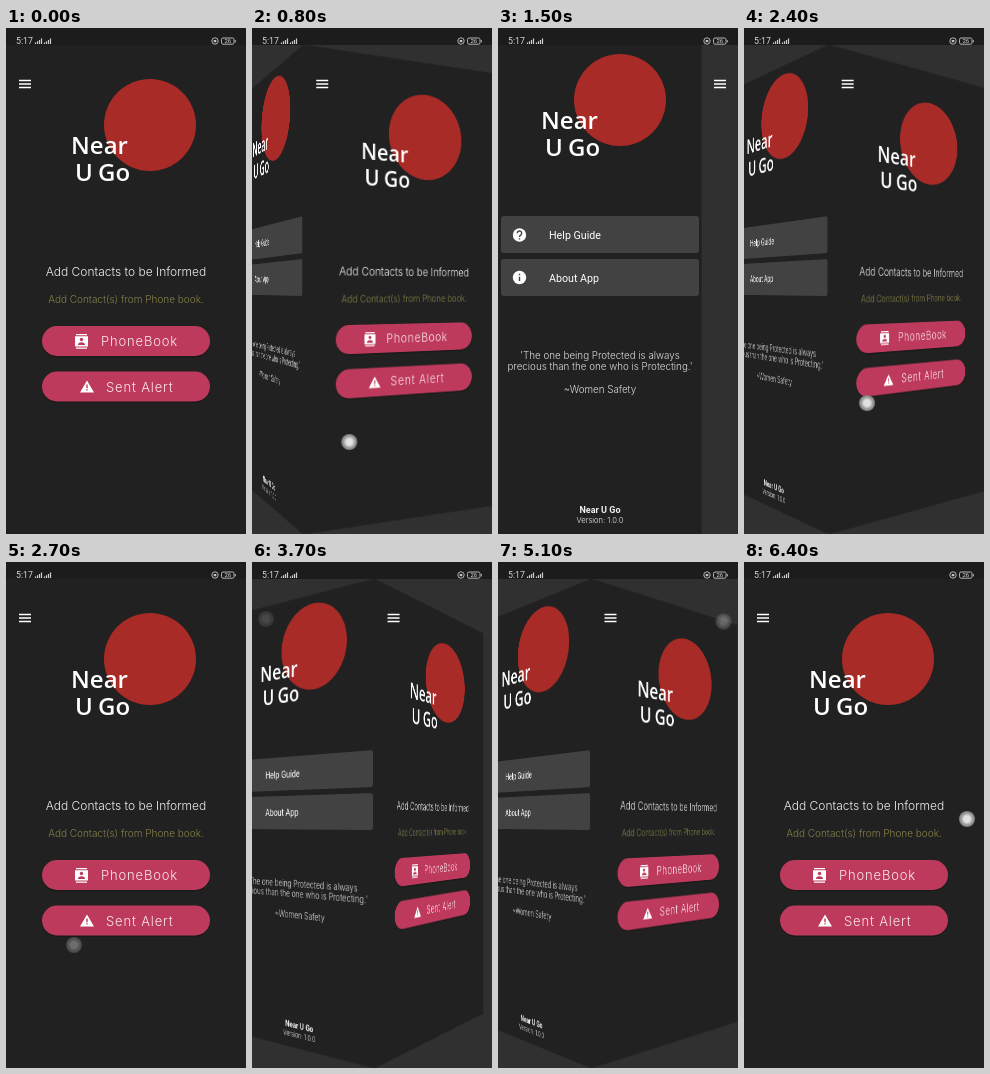
An HTML page that plays this animation: 240 by 506 pixels, repeating every 6500 ms.

```html
<!DOCTYPE html>
<html lang="en">
<head>
<meta charset="utf-8">
<title>Cube drawer</title>
<style>
  @property --open { syntax: "<number>"; inherits: true; initial-value: 0; }

  html, body { margin: 0; width: 100%; height: 100%; overflow: hidden; background: #303030; }
  .stage {
    position: relative; width: 240px; height: 506px; overflow: hidden;
    background: #303030;
    --slide: 203px;
    animation: drawer 6500ms linear infinite;
  }
  svg { position: absolute; top: 0; left: 0; display: block; }
  /* the thin shadow closes the seam between the two faces */
  .page { top: 17px; background: #212121; box-shadow: 0 0 0 .5px #212121; }
  .drawer {
    transform-origin: right center;
    transform: translateX(calc((var(--open) - 1) * var(--slide))) perspective(677px)
      rotateY(calc((var(--open) - 1) * 90deg));
  }
  .home {
    transform-origin: left center;
    transform: translateX(calc(var(--open) * var(--slide))) perspective(677px)
      rotateY(calc(var(--open) * 90deg));
  }
  .menu { transform: translateX(calc(var(--open) * var(--slide))); }

  text { fill: #f2f2f2; font-family: Inter, sans-serif; }
  .mid { text-anchor: middle; }
  .light { font-weight: 300; }
  .word { font: 600 24px "Open Sans", sans-serif; fill: #fff; }
  .item { font: 10.7px Roboto, sans-serif; fill: #fff; }
  .quote { font-size: 9.8px; fill: #dcdcdc; }
  .button { font-size: 13px; letter-spacing: .85px; fill: #fbe9ee; }
  .status { font: 8.8px Roboto, sans-serif; fill: #d8d8d8; }

  .touch {
    position: absolute; left: -8px; top: -8px; width: 16px; height: 16px;
    border-radius: 50%; opacity: 0;
    background: radial-gradient(circle, #e2e2e2 0 28%, #a5a5a5 48%, #777 72%);
    animation: touch 6500ms linear infinite;
  }

  @keyframes drawer {
    0%, 7.69% { --open: 0; }
    9.23% { --open: .04; }
    10.77% { --open: .13; }
    12.31% { --open: .251; }
    13.85% { --open: .42; }
    15.38% { --open: .6; }
    16.92% { --open: .78; }
    18.46% { --open: .93; }
    20%, 32.31% { --open: 1; }
    33.85% { --open: .92; }
    35.38% { --open: .7; }
    36.92% { --open: .42; }
    38.46% { --open: .18; }
    40% { --open: .03; }
    40.77%, 54.62% { --open: 0; }
    58.46%, 76.4% { --open: 1; }
    80.25%, 100% { --open: 0; }
  }
  @keyframes touch {
    /* drag open */
    0%, 7.3% { opacity: 0; transform: translate(46px, 414px); }
    7.69% { opacity: 1; transform: translate(46px, 414px); }
    10.77% { transform: translate(72px, 414px); }
    12.31% { transform: translate(97px, 414px); }
    15.38% { transform: translate(168px, 414px); }
    16.92% { opacity: 1; transform: translate(204px, 413px); }
    19.2% { opacity: 0; transform: translate(215px, 413px); }
    /* drag closed */
    31.2% { opacity: 0; transform: translate(229px, 357px); }
    31.6% { opacity: 1; transform: translate(229px, 357px); }
    32.31% { transform: translate(226px, 359px); }
    35.38% { transform: translate(165px, 370px); }
    38.46% { opacity: 1; transform: translate(82px, 380px); }
    40% { opacity: .8; transform: translate(68px, 383px); }
    41.54% { opacity: .4; transform: translate(68px, 383px); }
    43% { opacity: 0; transform: translate(68px, 383px); }
    /* tap menu to open */
    43.01%, 52.4% { opacity: 0; transform: translate(14px, 57px); }
    53%, 54.62% { opacity: .9; transform: translate(14px, 57px); }
    56.92% { opacity: .2; transform: translate(14px, 57px); }
    58.3% { opacity: 0; transform: translate(14px, 57px); }
    /* tap menu to close */
    58.31%, 73.9% { opacity: 0; transform: translate(225.5px, 59.5px); }
    74.5%, 76.4% { opacity: .9; transform: translate(225.5px, 59.5px); }
    78.46% { opacity: .36; transform: translate(225.5px, 59.5px); }
    80% { opacity: 0; transform: translate(225.5px, 59.5px); }
    /* next press */
    80.01%, 98% { opacity: 0; transform: translate(223px, 257px); }
    98.4%, 100% { opacity: 1; transform: translate(223px, 257px); }
  }
</style>
</head>
<body>
<div class="stage">
  <svg class="page drawer" width="203" height="489" viewBox="0 17 203 489">
    <defs>
      <g id="brand">
        <circle cx="144" cy="97" r="46" fill="#a92b27"/>
        <text class="word" x="65" y="126">Near</text>
        <text class="word" x="69" y="153">U</text>
        <text class="word" x="92" y="153">Go</text>
      </g>
    </defs>
    <use href="#brand" x="-22" y="-25"/>
    <g fill="#424242">
      <rect x="3" y="188" width="198" height="37" rx="3"/>
      <rect x="3" y="231" width="198" height="37" rx="3"/>
    </g>
    <g fill="#fff">
      <circle cx="21.5" cy="207" r="6.7"/>
      <circle cx="21.5" cy="249.5" r="6.7"/>
    </g>
    <g fill="none" stroke="#424242" stroke-width="1.4">
      <path d="M19.3 205.3a2.2 2.2 0 1 1 3.6 1.6q-1.4 1-1.4 2.2M21.5 210.2v1.4"/>
      <path d="M21.5 245.8v1.5M21.5 248.7v4.2"/>
    </g>
    <text class="item" x="51" y="211">Help Guide</text>
    <text class="item" x="51" y="253.5">About App</text>
    <g class="mid light">
      <text class="quote" x="102" y="331">'The one being Protected is always</text>
      <text class="quote" x="102" y="342">precious than the one who is Protecting.'</text>
      <text class="quote" x="102" y="365">~Women Safety</text>
      <text x="102" y="495" font-size="7.6">Version: 1.0.0</text>
    </g>
    <text class="mid" x="102" y="485" style="font:700 9px Roboto,sans-serif">Near U Go</text>
  </svg>

  <svg class="page home" width="240" height="489" viewBox="0 17 240 489">
    <use href="#brand"/>
    <text class="mid light" x="120" y="247.5" font-size="12">Add Contacts to be Informed</text>
    <text class="mid light" x="120" y="275" font-size="10" style="fill:#858048">Add Contact(s) from Phone book.</text>
    <g fill="#1a1a1a">
      <rect x="36" y="299.5" width="168" height="30" rx="15"/>
      <rect x="36" y="345" width="168" height="30" rx="15"/>
    </g>
    <g fill="#be3a5c">
      <rect x="36" y="298" width="168" height="30" rx="15"/>
      <rect x="36" y="343.5" width="168" height="30" rx="15"/>
    </g>
    <g fill="#fff">
      <path d="M70 306h11v1.3H70zM70 319.5h11v1.3H70zM69 308.3h13v10.2H69zM81 352.5l7 12H74z"/>
      <g fill="#be3a5c">
        <circle cx="75.5" cy="311.5" r="1.7"/>
        <path d="M72 317q0-2.8 3.5-2.8t3.5 2.8zM80.3 356.5h1.4v3.7h-1.4zM80.3 361.2h1.4v1.4h-1.4z"/>
      </g>
    </g>
    <text class="button light" x="95" y="318">PhoneBook</text>
    <text class="button light" x="100" y="363.5">Sent Alert</text>
  </svg>

  <svg class="menu" width="240" height="506">
    <path d="M13 52.5h12M13 56h12M13 59.5h12" stroke="#fff" stroke-width="1.5"/>
  </svg>

  <svg width="240" height="17">
    <rect width="240" height="17" fill="#1c1c1c"/>
    <text class="status" x="10" y="16">5:17</text>
    <path d="M29.5 16v-1.5M31.5 16v-2.8M33.5 16v-4M35.5 16v-5.5M38.5 16v-1.5M40.5 16v-2.8M42.5 16v-4M44.5 16v-5.5"
      stroke="#d0d0d0" stroke-width="1.2"/>
    <g fill="none" stroke="#c4c4c4" stroke-width=".9">
      <circle cx="209" cy="13" r="3.2"/>
      <rect x="215.5" y="10" width="12.5" height="6.2" rx="1.5"/>
      <path d="M229.3 12v2.4"/>
    </g>
    <rect x="207.7" y="12" width="2.6" height="2.2" fill="#c4c4c4"/>
    <text class="status mid" x="221.8" y="15.3" style="font-size:6px">26</text>
  </svg>

  <div class="touch"></div>
</div>
</body>
</html>
```
